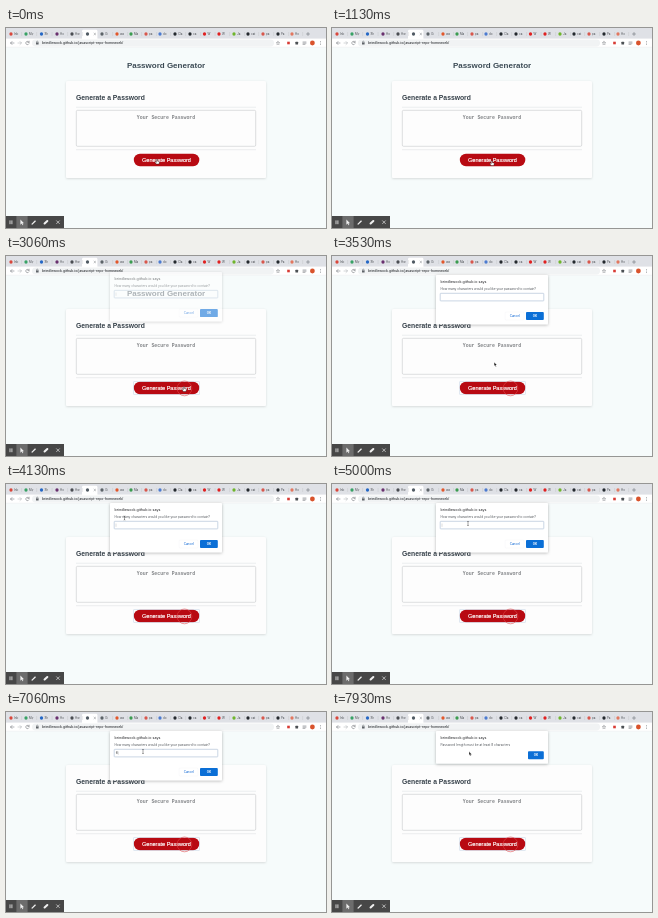
Animation of 320x200 px, one loop 8000 ms. Source, as an HTML page:

```html
<!DOCTYPE html>
<html lang="en">
<head>
<meta charset="utf-8">
<title>Password Generator</title>
<style>
  html, body { margin: 0; width: 100%; height: 100%; overflow: hidden; background: #f6fbfb; }
  svg { display: block; width: 320px; height: 200px; }
  text { white-space: pre; }
  .page { font-family: "Liberation Sans", Arial, sans-serif; }
  .ui { font-family: Inter, Roboto, sans-serif; }
  .mono { font-family: "Liberation Mono", monospace; }
  .bold { font-weight: 700; }
  .icon { fill: none; stroke: #5f6368; stroke-width: .5; stroke-linecap: round; stroke-linejoin: round; }
</style>
</head>
<body>
<svg viewBox="0 0 320 200">
  <defs>
    <filter id="cardShadow" x="-10%" y="-10%" width="120%" height="125%">
      <feDropShadow dx="0" dy=".8" stdDeviation="1.1" flood-color="#000" flood-opacity=".14"/>
    </filter>
    <filter id="boxShadow" x="-15%" y="-20%" width="130%" height="150%">
      <feDropShadow dx="0" dy=".8" stdDeviation="1.4" flood-color="#000" flood-opacity=".3"/>
    </filter>
  </defs>

  <rect width="320" height="200" fill="#f6fbfb"/>

  <g class="page">
    <text class="bold" x="160" y="40" font-size="8" text-anchor="middle" fill="#3b4a54">Password Generator</text>
    <rect x="60" y="53" width="200" height="97" rx="1.5" fill="#fdfdfd" filter="url(#cardShadow)"/>
    <text class="bold" x="70" y="71.6" font-size="6.78" fill="#343f48">Generate a Password</text>
    <path d="M70 79.2H250M70 121.7H250" stroke="#e0e2e4" stroke-width=".6"/>
    <rect x="70.3" y="82.3" width="179.4" height="36" rx="1.2" fill="#fdfdfd" stroke="#c6c8ca" stroke-width=".6"/>
    <text class="mono bold" x="160" y="90.5" font-size="4.87" text-anchor="middle" fill="#808386">Your Secure Password</text>
    <rect x="127.8" y="125.8" width="65.5" height="12.4" rx="6.2" fill="#b80a12"/>
    <text x="160.5" y="133.8" font-size="5.54" text-anchor="middle" fill="#fff" stroke="#fff" stroke-width=".18">Generate Password</text>
    <g id="focus" fill="none">
      <rect x="127.5" y="125.5" width="66" height="13" rx=".5" stroke="#c3d3e4" stroke-width=".5"/>
      <circle cx="178.5" cy="132.4" r="7.4" stroke="#e0474b" stroke-width=".7" stroke-opacity=".8"/>
    </g>
  </g>

  <g id="browser" class="ui">
    <rect width="320" height="11" fill="#dfe1e6"/>
    <path d="M76 11V3.2Q76 1.8 77.4 1.8H90Q91.4 1.8 91.4 3.2V11Z" fill="#fff"/>
    <rect y="10.6" width="320" height="8.6" fill="#fff"/>
    <rect x="26" y="11.6" width="242" height="6.9" rx="3.4" fill="#f1f3f4"/>
    <path d="M0 19.2H320" stroke="#e3e5e7" stroke-width=".4"/>
    <g id="tabs" font-size="2.9" fill="#4a4d52"></g>
    <g class="icon">
      <path d="M8 15H4.6M6 13.5L4.5 15L6 16.5"/>
      <path d="M12 15H15.4M14 13.5L15.5 15L14 16.5" stroke="#a5a8ac"/>
      <path d="M23 14.2A1.7 1.7 0 1 0 23 15.8M23.1 13.1V14.4H21.8"/>
      <path d="M30.5 14.6V13.9A.8.8 0 0 1 32.1 13.9V14.6"/>
      <path d="M272 13.3L272.5 14.5L273.8 14.6L272.8 15.4L273.1 16.7L272 16L270.9 16.7L271.2 15.4L270.2 14.6L271.5 14.5Z" stroke-width=".35"/>
      <path d="M300.5 6H303.5M302 4.5V7.5"/>
      <path d="M88 5.2L89.6 6.8M89.6 5.2L88 6.8" stroke-width=".4"/>
    </g>
    <rect x="30" y="14.6" width="2.6" height="2" rx=".3" fill="#5f6368"/>
    <text x="36" y="16.3" font-size="3.42" font-weight="500" fill="#2b2e32">brindlewock.github.io/javascript-repo-homework/</text>
    <rect x="281.2" y="13.7" width="2.6" height="2.6" fill="#d83a34"/>
    <rect x="289.4" y="13.7" width="2.7" height="2.7" rx=".5" fill="#4c5054"/>
    <path d="M297 14H300M297 15.2H300M297 16.4H299" class="icon"/>
    <circle cx="306.4" cy="15" r="2.4" fill="#d9532c"/>
    <g fill="#5f6368"><circle cx="314.4" cy="13.5" r=".4"/><circle cx="314.4" cy="15" r=".4"/><circle cx="314.4" cy="16.5" r=".4"/></g>
  </g>

  <g id="prompt" class="ui">
    <rect x="104" y="19" width="112" height="49.3" rx="1" fill="#fff" filter="url(#boxShadow)"/>
    <text x="108.5" y="26.5" font-size="3.65" fill="#202124">brindlewock.github.io says</text>
    <text x="108.5" y="34" font-size="3.18" fill="#55595e">How many characters would you like your password to contain?</text>
    <rect x="108.2" y="37.3" width="103.6" height="7.6" rx=".6" fill="#fff" stroke="#b3c4d8" stroke-width=".7"/>
    <text id="typed" x="109.8" y="42.4" font-size="3.3" fill="#333">6</text>
    <path id="caret" d="M0 39.5V42.8" stroke="#777" stroke-width=".25"/>
    <rect x="173.2" y="56" width="18.8" height="8" rx=".9" fill="#fff" stroke="#eceef0" stroke-width=".3"/>
    <text x="182.7" y="61.1" font-size="3" font-weight="500" text-anchor="middle" fill="#1a6fd6">Cancel</text>
    <rect x="194" y="56" width="17.8" height="8" rx=".9" fill="#0b6fd6"/>
    <text x="202.9" y="61.1" font-size="3" font-weight="700" text-anchor="middle" fill="#fff">OK</text>
  </g>

  <g id="alert" class="ui">
    <rect x="104" y="19" width="112" height="32.6" rx="1" fill="#fff" filter="url(#boxShadow)"/>
    <text x="108.5" y="26.5" font-size="3.65" fill="#202124">brindlewock.github.io says</text>
    <text x="108.5" y="34" font-size="3.2" fill="#55595e">Password length must be at least 8 characters</text>
    <rect x="196" y="39.2" width="15.8" height="8" rx=".9" fill="#0b6fd6"/>
    <text x="203.9" y="44.3" font-size="3" font-weight="700" text-anchor="middle" fill="#fff">OK</text>
  </g>

  <g id="recorder">
    <rect y="188" width="58" height="12" fill="#474747"/>
    <rect x="10.4" y="188" width="11.2" height="12" fill="#6c6c6c"/>
    <path d="M4 192.4V196.2M5.9 192.4V196.2" stroke="#e4e4e4" stroke-width=".9"/>
    <path d="M14.4 191.6V196.8L15.7 195.6L16.6 197.3L17.3 197L16.5 195.3H18Z" fill="#f0f0f0"/>
    <path d="M26.1 196.1L29.5 192.7" stroke="#f0f0f0" stroke-width="1.3"/>
    <path d="M25.5 196.8L25.8 195.6L26.7 196.5Z" fill="#f0f0f0"/>
    <path d="M38.6 195.5L41.3 193" stroke="#f0f0f0" stroke-width="2.1" stroke-linecap="round"/>
    <path d="M50.3 192.5L53.7 195.9M53.7 192.5L50.3 195.9" stroke="#e4e4e4" stroke-width=".7"/>
  </g>

  <g id="cursor">
    <path id="hand" d="M-.6 -1.2Q-.6 -1.8 0 -1.8T.6 -1.2V.2L2 .5Q2.5 .7 2.4 1.3L2 3.1H-.7L-2 1.2Q-2 .5 -1.3 .7L-.6 1.3Z" fill="#fff" stroke="#111" stroke-width=".4"/>
    <path id="arrow" d="M0 0V3.9L.9 3.1L1.5 4.6L2.2 4.3L1.6 2.9H2.8Z" fill="#111" stroke="#fff" stroke-width=".35"/>
    <path id="beam" d="M-.8 -2.1Q0 -2.1 0 -1.5Q0 -2.1 .8 -2.1M0 -1.7V1.7M-.8 2.1Q0 2.1 0 1.5Q0 2.1 .8 2.1" fill="none" stroke="#333" stroke-width=".45"/>
  </g>
</svg>
<script>
const LOOP = 8000;
const $ = id => document.getElementById(id);

// Tabs: icon x, icon colour, label
const tabs = [
  [5, '#d9473c', 'Inb'], [20, '#38a265', 'My'], [35.5, '#2467c5', 'Sh'], [51, '#69306e', 'Ho'],
  [66, '#4a4d52', 'Hw'], [81.5, '#4f5962', 'Pa'], [96, '#5c6368', 'Gi'], [111, '#e2572b', 'wa'],
  [125, '#3b9c50', 'Ma'], [140, '#d8574c', 'pa'], [154, '#4c7bd0', 'do'], [169, '#24292e', 'Cla'],
  [184, '#24292e', 'ca'], [198.5, '#e02020', 'W'], [213, '#e02020', 'W'], [228, '#6fb52c', 'Ja'],
  [242, '#24292e', 'cat'], [257, '#d8574c', 'pa'], [272, '#24292e', 'Pa'], [286, '#e2775f', 'Ho']
];
$('tabs').innerHTML = tabs.map(([x, color, label]) => {
  const active = label === 'Pa' && x < 100;
  return `<circle cx="${x}" cy="6" r="1.65" fill="${color}"/>` + (active ? '' :
    `<text x="${x + 3}" y="7.1">${label}</text>` +
    `<path d="M${x + 10.6} 4V8" stroke="#b4b7bc" stroke-width=".3"/>`);
}).join('');

// Pointer: time, x, y
const path = [
  [0, 151, 133], [60, 151, 133], [200, 152, 133], [400, 152, 133], [1200, 160, 134.5],
  [2060, 172, 137], [2200, 173, 138], [2400, 173, 138], [2850, 178, 132.4], [3260, 178, 132.4],
  [4060, 118.5, 34], [4130, 118.5, 34], [4930, 136, 39.5], [5000, 136, 39.5],
  [5530, 137, 39.5], [8000, 137, 39.5]
];

const clamp = v => Math.max(0, Math.min(1, v));
const ramp = (t, from, to) => clamp((t - from) / (to - from));
const ease = p => p * p * (3 - 2 * p);
const show = (id, on) => { $(id).style.display = on ? '' : 'none'; };

function pointAt(t) {
  const i = path.findIndex(k => k[0] > t);
  const [t0, x0, y0] = path[i - 1], [t1, x1, y1] = path[i];
  const p = ease((t - t0) / (t1 - t0));
  return [x0 + (x1 - x0) * p, y0 + (y1 - y0) * p];
}

function fade(id, opacity, shift) {
  show(id, opacity > 0);
  $(id).setAttribute('opacity', opacity);
  $(id).setAttribute('transform', `translate(0 ${shift})`);
}

function draw(t) {
  const open = ramp(t, 2980, 3120), close = ramp(t, 7130, 7260), warn = ramp(t, 7300, 7440);
  fade('prompt', open * (1 - close), -7 * (1 - open) - 7 * close);
  fade('alert', warn, -7 * (1 - warn));
  show('focus', t >= 2900);

  const typed = t >= 6460;
  show('typed', typed);
  show('caret', typed ? (t - 6460) % 1000 < 700 : (t - 2980) % 1000 < 500);
  $('caret').setAttribute('transform', `translate(${typed ? 112.3 : 110} 0)`);

  const [x, y] = pointAt(t);
  const overText = t < 7200 && y < 45;
  const overButton = t < 3000 || (t < 3300 && y > 126);
  show('hand', overButton);
  show('beam', overText);
  show('arrow', !overButton && !overText);
  $('cursor').setAttribute('transform', `translate(${x} ${y})`);
}

function tick() {
  draw(performance.now() % LOOP);
  requestAnimationFrame(tick);
}
tick();
</script>
</body>
</html>
```
